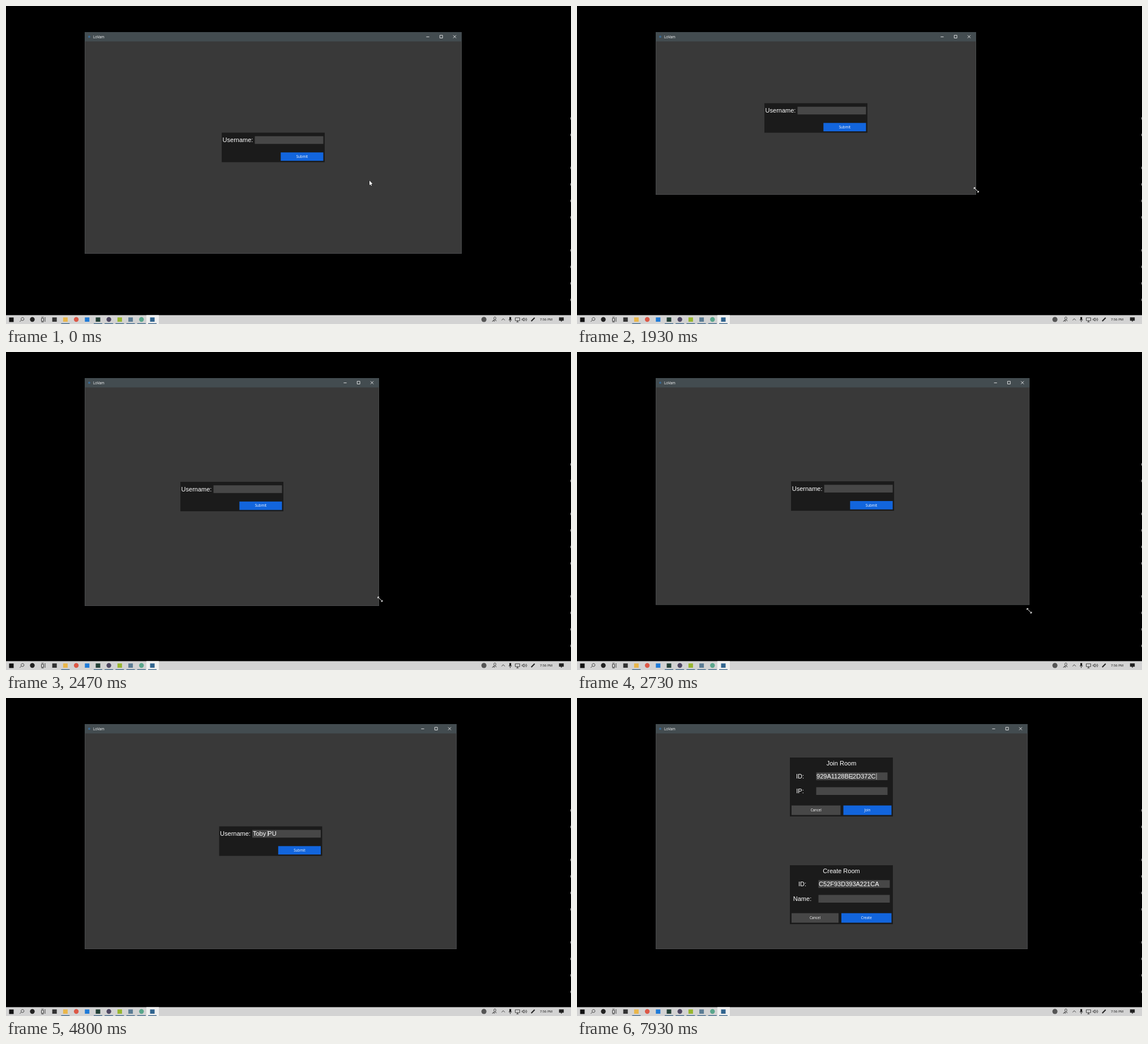
Animation, 998 px wide and 561 px high, one loop 8000 ms. Source, as an HTML page with a canvas:

```html
<!DOCTYPE html>
<html lang="en">
<head>
<meta charset="utf-8">
<title>Login demo</title>
<style>
html, body { margin: 0; width: 100%; height: 100%; overflow: hidden; background: #000; }
canvas { display: block; }
</style>
</head>
<body>
<canvas id="stage" width="998" height="561"></canvas>
<script>
const ctx = document.getElementById('stage').getContext('2d');
const LOOP = 8000, STEP = 200 / 3;
const LEFT = 139, TOP = 46, BAR = 16.5, TASKBAR = 545.4;
const FORM = '11px "Liberation Sans", Arial, sans-serif';
const UI = '6.2px "Open Sans", "Noto Sans", sans-serif';
const BLUE = '#1265dd', FIELD = '#474747', INK = '#1b1b1b', DARK = '#222';

const DRAG_START = 1600, LAP_START = 29 * STEP, LAP = 8 * STEP, DRAG_END = 47 * STEP;
const ROOMS_OPEN = 7270, ID_PASTED = 7930;

const progress = (t, from, to) => Math.min(1, Math.max(0, (t - from) / (to - from)));
const smooth = u => u * u * (3 - 2 * u);
const easeOut = u => 1 - (1 - u) ** 3;
const mix = (a, b, u) => a.map((v, i) => v + (b[i] - v) * u);

// The dragged corner circles on a drifting ellipse, then settles
function windowCorner(t) {
  const laps = (t - LAP_START) / LAP, drift = Math.min(laps, 1), angle = 2 * Math.PI * laps;
  const orbit = [776 - 46 * drift - 71 * Math.cos(angle), 333 + 115 * drift - 79 * Math.sin(angle)];
  const dragged = mix([805, 437], orbit, smooth(progress(t, DRAG_START, LAP_START)));
  return mix(dragged, [796, 443], smooth(progress(t, LAP_START + LAP, DRAG_END)));
}

function pointerAt(t) {
  const [x, y] = windowCorner(t + 15);
  const grip = [x + 0.5, y + 2];
  const glide = (from, to, start, end) => mix(from, to, easeOut(progress(t, start, end)));
  let spot = glide([642, 308], grip, 0, 870);
  spot = glide(spot, [462.5, 239], 3200, 3670);
  spot = glide(spot, [499, 270], 6760, 7070);
  return glide(spot, [486, 138.5], 7670, 7870);
}

function typedName(t) {
  const keys = (start, rate) => Math.max(0, Math.floor((t - start) / rate) + 1);
  const slip = 'PUMI'.slice(0, keys(4730, 70));
  const erased = Math.min(3, keys(5270, 200));
  return 'Toby '.slice(0, keys(4130, 100)) + slip.slice(0, slip.length - erased) +
    'umil'.slice(0, keys(6070, 85));
}

function box(x, y, w, h, color) {
  ctx.fillStyle = color;
  ctx.fillRect(x, y, w, h);
}
function disc(x, y, r, color) {
  ctx.fillStyle = color;
  ctx.beginPath();
  ctx.arc(x, y, r, 0, 7);
  ctx.fill();
}
function shape(path, x, y, stroke, fill, width = 0.8) {
  const outline = new Path2D(path);
  ctx.save();
  ctx.translate(x, y);
  ctx.lineWidth = width;
  ctx.strokeStyle = stroke;
  ctx.stroke(outline);
  if (fill) {
    ctx.fillStyle = fill;
    ctx.fill(outline);
  }
  ctx.restore();
}
function text(str, x, y, font = FORM, align = 'left', color = '#fff') {
  ctx.font = font;
  ctx.textAlign = align;
  ctx.fillStyle = color;
  ctx.fillText(str, x, y);
}
function button(label, x, y, w, h, color) {
  box(x, y, w, h, color);
  text(label, x + w / 2, y + h / 2 + 2.2, UI, 'center');
}

function drawDesktop() {
  box(0, 0, 998, 561, '#000');
  for (let row = 3; row < 15; row++) if (row % 5) box(997, 109 + row * 29.1, 1, 4, '#aaa');
}

function drawApps() {
  const squares = ['#333', '#eab64a', '', '#1f7bd8', '#234036', '', '#98b62f', '#5b7c94', '', '#30648f'];
  const discs = { 2: '#dc5846', 5: '#4d4660', 8: '#5aa68c' };
  squares.forEach((color, i) => {
    const x = 85.7 + i * 19.2;
    if (i === 9) box(x - 10.5, TASKBAR, 22, 16, '#f0f0f0');
    if (i === 1 || i > 3) box(x - 7.5, 559.6, 15, 1.4, '#476c8c');
    if (discs[i]) disc(x, 553, 4.2, discs[i]);
    else box(x - 4, 549.4, 8, 7.6, color);
  });
}

function drawTaskbar() {
  box(0, TASKBAR, 998, 16, '#d3d3d3');
  box(5.5, 549.5, 8, 8, '#111');
  shape('M-1 1L-4 4M-1 1a2.6 2.6 0 1 1 .1 .1', 28.3, 553, DARK);
  disc(46.5, 553, 4.2, DARK);
  shape('M-3 -2h4v5h-4zM-3 -4h4M-3 4.4h4M3.5 -4v8', 65.5, 553, DARK);
  drawApps();

  disc(844.2, 553, 4.5, '#555');
  shape('M-1 -2a1.7 1.7 0 1 1 3 0a1.7 1.7 0 1 1 -3 0M-2 3q3 -5 5 0M-4 4q2 -5 4 0', 863, 553, DARK);
  shape('M-2.8 1.5l2.8 -3l2.8 3', 878.3, 553, DARK);
  box(889.2, 548.8, 3, 5, '#111');
  shape('M-2.6 0q2.6 5 5.2 0M0 2.5v2', 890.7, 553, DARK);
  shape('M-4 -3h8v5h-8zM0 2v2.4M-2 4.4h4', 903.5, 553, DARK);
  shape('M-4 -1h1.6l2 -2v6l-2 -2h-1.6zM1.5 -1.5q1.5 1.5 0 3M3 -3q3 3 0 6', 915.5, 553, DARK);
  shape('M-3 3l6 -6', 930.8, 553, DARK, null, 2);
  text('7:56 PM', 954, 555.2, '5.9px "Open Sans", "Noto Sans", sans-serif', 'center', '#111');
  shape('M-4 -3.5h8v5.5h-3l-1 2l-1 -2h-3z', 981, 553, DARK, DARK, 0.4);
}

function drawWindow(right, bottom) {
  box(LEFT, TOP, right - LEFT, bottom - TOP, '#545759');
  box(LEFT + 0.6, TOP, right - LEFT - 1.2, bottom - TOP - 0.6, '#393939');
  box(LEFT, TOP, right - LEFT, BAR, '#434c50');
  disc(147, 54.3, 2, '#3b6a92');
  text('LoVam', 154, 56.6, UI);
  shape('M-2.6 0h5.2', right - 60, 54.4, '#fff');
  shape('M-2.4 -2.4h4.8v4.8h-4.8z', right - 36.3, 54.1, '#fff');
  shape('M-2.5 -2.5l5 5M-2.5 2.5l5 -5', right - 12.5, 54.1, '#fff');
}

function drawLogin(right, bottom, name) {
  const x = (LEFT + right) / 2 - 91, y = (TOP + 16 + bottom) / 2 - 26;
  box(x, y, 182, 52, INK);
  text('Username:', x + 1.6, y + 16.6);
  box(x + 58.5, y + 6.2, 121, 13.6, FIELD);
  text(name, x + 59.5, y + 16.6);
  button('Submit', x + 104.3, y + 34.8, 75.2, 14.8, BLUE);
}

function drawRoom(y, title, fields, shift, split, action) {
  box(376, y, 182, 104, INK);
  text(title, 467, y + 13.6, FORM, 'center');
  Object.entries(fields).forEach(([label, value], i) => {
    const top = y + 26.3 + i * 26.1;
    box(422.5 + shift, top, 126, 13.6, FIELD);
    text(label + ':', 394 + shift, top + 10.8, FORM, 'center');
    text(value, 423.1 + shift, top + 10.8);
  });
  button('Cancel', 379, y + 84.6, split - 379, 16.8, FIELD);
  button(action, split + 5, y + 84.6, 550.5 - split, 16.8, BLUE);
}

function drawRooms(pasted) {
  drawRoom(105, 'Join Room', { ID: pasted ? '929A1128BE2D372C' : '', IP: '' }, 0, 465.5, 'Join');
  drawRoom(295, 'Create Room', { ID: 'C52F93D393A221CA', Name: '' }, 4, 462, 'Create');
  if (pasted) box(528.6, 132.8, 0.8, 11.2, '#ddd');
}

function drawPointer(t, [x, y]) {
  const resizing = t >= 1000 && t < 3270;
  const overField = (t >= 3530 && t < 6800) || t >= 7870;
  if (resizing) shape('M-4 -1.5v-2.5h2.5M-4 -4l8 8M1.5 4h2.5v-2.5', x, y, '#fff', null, 1);
  else if (overField) shape('M-1.2 -4h2.4M0 -4v8M-1.2 4h2.4', x, y, '#ddd', null, 0.6);
  else shape('M0 0v8.2l1.9 -1.7l1.2 2.7l1.2 -.5l-1.2 -2.7l2.5 -.2z', x, y, '#000', '#fff');
}

function render(t) {
  const moment = Math.floor((t + 4) / STEP) * STEP;
  const [right, bottom] = windowCorner(moment);
  drawDesktop();
  drawWindow(right, bottom);
  if (t < ROOMS_OPEN) drawLogin(right, bottom, typedName(t));
  else drawRooms(t >= ID_PASTED);
  drawTaskbar();
  drawPointer(t, pointerAt(moment));
}

const start = performance.now();
function tick() {
  render((performance.now() - start) % LOOP);
  requestAnimationFrame(tick);
}
tick();
</script>
</body>
</html>
```
